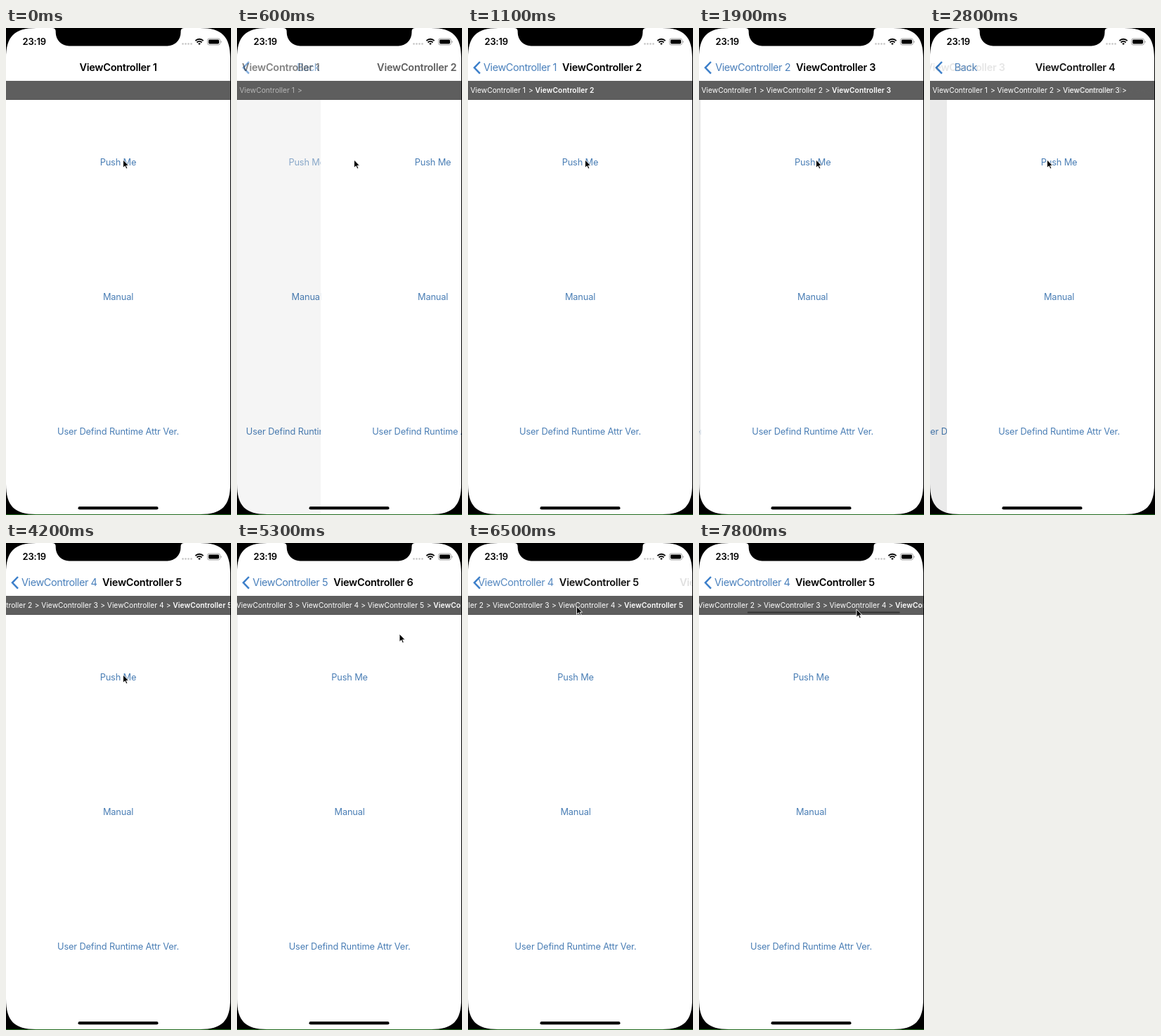
An HTML page for the animation above (8000 ms loop, 320 by 691 pixels).

```html
<!DOCTYPE html>
<html lang="en">
<head>
<meta charset="utf-8">
<title>Breadcrumb navigation</title>
<style>
  html, body { margin: 0; width: 100%; height: 100%; overflow: hidden; background: #000; }
  svg { display: block; width: 100%; height: 100%; font-family: Inter, Roboto, sans-serif; white-space: pre; }
  .title { font-size: 14.5px; font-weight: 600; letter-spacing: -.018em; text-anchor: middle; }
  .back { font-size: 14.5px; letter-spacing: -.03em; fill: #4a80bc; }
  .button { font-size: 12.8px; letter-spacing: -.012em; text-anchor: middle; fill: #4a7eb5; }
  .crumb { font-size: 10.24px; fill: #fff; }
  .bold { font-weight: 600; letter-spacing: .008em; }
  .clock { font-size: 13px; font-weight: 600; letter-spacing: -.015em; }
</style>
</head>
<body>
<svg viewBox="0 0 320 691">
  <defs>
    <clipPath id="barClip"><rect y="75" width="320" height="27"/></clipPath>
    <clipPath id="pageClip"><rect y="102" width="320" height="589"/></clipPath>
  </defs>
  <rect width="320" height="691" fill="#fff"/>
  <g id="pages" clip-path="url(#pageClip)"></g>
  <g id="nav"></g>
  <rect y="75" width="320" height="27" fill="#5e5e5e"/>
  <path d="M0 101.5H320" stroke="#555"/>
  <g id="crumbs" clip-path="url(#barClip)"></g>
  <rect x="102.500" y="679" width="114" height="4.300" rx="2.150"/>
  <text class="clock" x="23.500" y="24">23:19</text>
  <g fill="#c4c4c4">
    <circle cx="251.500" cy="22.500" r="1.300"/><circle cx="255.500" cy="22.500" r="1.300"/>
    <circle cx="259.500" cy="22.500" r="1.300"/><circle cx="263.500" cy="22.500" r="1.300"/>
  </g>
  <g fill="none" stroke="#000" stroke-width="1.900">
    <path d="M269.400 18.100A8 8 0 0 1 280.600 18.100M271.500 20.500A5 5 0 0 1 278.500 20.500"/>
    <path d="M275 24L273.200 22.200A2.600 2.600 0 0 1 276.800 22.200Z" fill="#000" stroke="none"/>
  </g>
  <rect x="286.500" y="15" width="18" height="9" rx="2.600" fill="none" stroke="#999" stroke-width=".9"/>
  <rect x="288" y="16.500" width="15" height="6" rx="1.400"/>
  <path d="M305.700 18v3q1.200-.5 1.200-1.500t-1.200-1.500" fill="#999"/>
  <path fill-rule="evenodd" d="M0 0H320V691H0ZM43 0H276C307 0 319 12 319 43V647C319 678 307 690 276 690H43C12 690 0 678 0 647V43C0 12 12 0 43 0Z"/>
  <path d="M65.700 0Q70.700 0 70.700 5V6.500A19 19 0 0 0 89.700 25.500H229.500A19 19 0 0 0 248.500 6.500V5Q248.500 0 253.500 0Z"/>
  <path d="M0 690.500H320" stroke="#1f6a1c"/>
  <path id="cursor" d="M0 0V11.300L2.700 8.800L4.400 12.800L6.300 12L4.600 8.200H8Z" stroke="#fff" stroke-width=".9"/>
</svg>
<script>
const LOOP = 8000;
const MOVES = [
  { at: 450, from: 1, to: 2 },
  { at: 1400, from: 2, to: 3 },
  { at: 2500, from: 3, to: 4 },
  { at: 3490, from: 4, to: 5 },
  { at: 4700, from: 5, to: 6 },
  { at: 6190, from: 6, to: 5 },
];
// time, x, y
const CURSOR = [
  [0, 166.5, 187], [4750, 166.5, 187], [5250, 231, 129], [5400, 231, 129],
  [6000, 154.5, 90], [7000, 154.5, 90], [7200, 178, 92], [7350, 178, 92], [7800, 224, 94],
];
const BUTTONS = [["Push Me", 195], ["Manual", 386], ["User Defind Runtime Attr Ver.", 577]];

const $ = id => document.getElementById(id);
const clamp = v => Math.max(0, Math.min(1, v));
const ramp = (t, start, end) => clamp((t - start) / (end - start));
const smooth = u => u * u * (3 - 2 * u);
const mix = (a, b, u) => a + (b - a) * u;
const name = n => "ViewController " + n;
const text = (cls, x, y, str, opacity = 1) => opacity <= 0 ? "" :
  `<text class="${cls}" x="${x}" y="${y}" opacity="${opacity}">${str.replace(">", "&gt;")}</text>`;

// Critically damped spring: share of the distance still to go.
function remaining(ms) {
  const k = 0.0141 * ms;
  return ms > 650 ? 0 : Math.exp(-k) * (1 + k);
}

function cursorAt(t) {
  const i = CURSOR.findIndex(p => p[0] > t);
  if (i < 0) return CURSOR.at(-1).slice(1);
  const [a, b] = [CURSOR[i - 1], CURSOR[i]];
  const u = smooth(ramp(t, a[0], b[0]));
  return [mix(a[1], b[1], u), mix(a[2], b[2], u)];
}

function page(x, pushOpacity = 1) {
  return `<g transform="translate(${x})"><rect width="320" height="691" fill="#fff"/>` +
    BUTTONS.map(([label, y], i) => text("button", 159.5, y, label, i ? 1 : pushOpacity)).join("") + "</g>";
}

function drawPages(move, rest, pressed, age) {
  if (!rest) return page(0, pressed ? 0.25 : 1);
  const push = move.to > move.from;
  const under = push ? 1 - rest : rest;
  const fade = push ? mix(0.25, 1, ramp(age, 0, 300)) : 1;
  return page(-96 * under, fade) +
    `<rect width="320" height="691" opacity="${0.095 * under * under}"/>` + page(320 * (1 - under));
}

const titleX = n => n === 1 ? 159.5 : n === 2 ? 190.5 : 193.5;
const title = (n, dx, opacity) => text("title", titleX(n) + dx, 61, name(n), opacity);
const back = (label, dx, opacity) => text("back", 22 + dx, 61, label, opacity);

function drawNav({ from, to }, rest, age) {
  const done = 1 - rest, push = to > from;
  let out = "";
  if (to > 1) {
    out += `<path d="M17 48L9 56.300L17 64.600" fill="none" stroke="#3c7fca" stroke-width="2.500"
      opacity="${from === 1 ? done : 1}"/>`;
    const label = push && age < 450 ? "Back" : name(to - 1);
    out += back(label, rest * (push ? 170 : -115), done);
  }
  if (rest) {
    if (from > 1) out += back(name(from - 1), done * (push ? -60 : 110), 1 - 2.5 * done);
    out += title(from, done * (push ? -155 : 176), push ? rest * 1.3 : rest * 1.8);
  }
  return out + title(to, rest * (push ? 175 : -107), done);
}

const crumbX = n => n === 1 ? 3.5 : 95.5 + 93.5 * (n - 2);
const endScroll = n => Math.max(0, 143 + 93.5 * (n - 5));

function drawCrumbs({ from, to }, age, t) {
  const push = to > from;
  const delay = push ? 450 : 75;
  let scroll = mix(endScroll(from), endScroll(to), smooth(ramp(age, delay, delay + 300)));
  scroll -= 46 * smooth(ramp(t, 7350, 7800));
  let out = "";
  if (to > 1) {
    for (let n = 1; n < to; n++) {
      const fresh = push && n === from;
      const shown = fresh ? ramp(age, 0, 280) : 1;
      out += text("crumb", crumbX(n), 92, name(n), shown) + text("crumb", crumbX(n + 1) - 9.5, 92, ">", shown);
      if (fresh && n > 1) out += text("crumb bold", crumbX(n), 92, name(n), 1 - ramp(age, 100, 360));
    }
    out += text("crumb bold", crumbX(to), 92, name(to), push ? ramp(age, 300, 480) : 1);
    if (!push) out += text("crumb bold", crumbX(from), 92, name(from), 1 - ramp(age, 0, 300));
  }
  out = `<g transform="translate(${-scroll})">${out}</g>`;
  const width = 463;
  if (t > 7350) out += `<rect x="${3 + scroll / width * 314}" y="97.500" width="${320 / width * 314}"
    height="2" rx="1" fill="#333" opacity="${ramp(t, 7350, 7450)}"/>`;
  return out;
}

function render(t) {
  const move = MOVES.findLast(m => m.at <= t) || { at: -LOOP, from: 1, to: 1 };
  const age = t - move.at, rest = remaining(age);
  const pressed = MOVES.some(m => m.to > m.from && t >= m.at - 100 && t < m.at);
  $("pages").innerHTML = drawPages(move, rest, pressed, age);
  $("nav").innerHTML = drawNav(move, rest, age);
  $("crumbs").innerHTML = drawCrumbs(move, age, t);
  $("cursor").setAttribute("transform", `translate(${cursorAt(t)})`);
}

const start = performance.now();
function tick() {
  render((performance.now() - start) % LOOP);
  requestAnimationFrame(tick);
}
tick();
</script>
</body>
</html>
```
